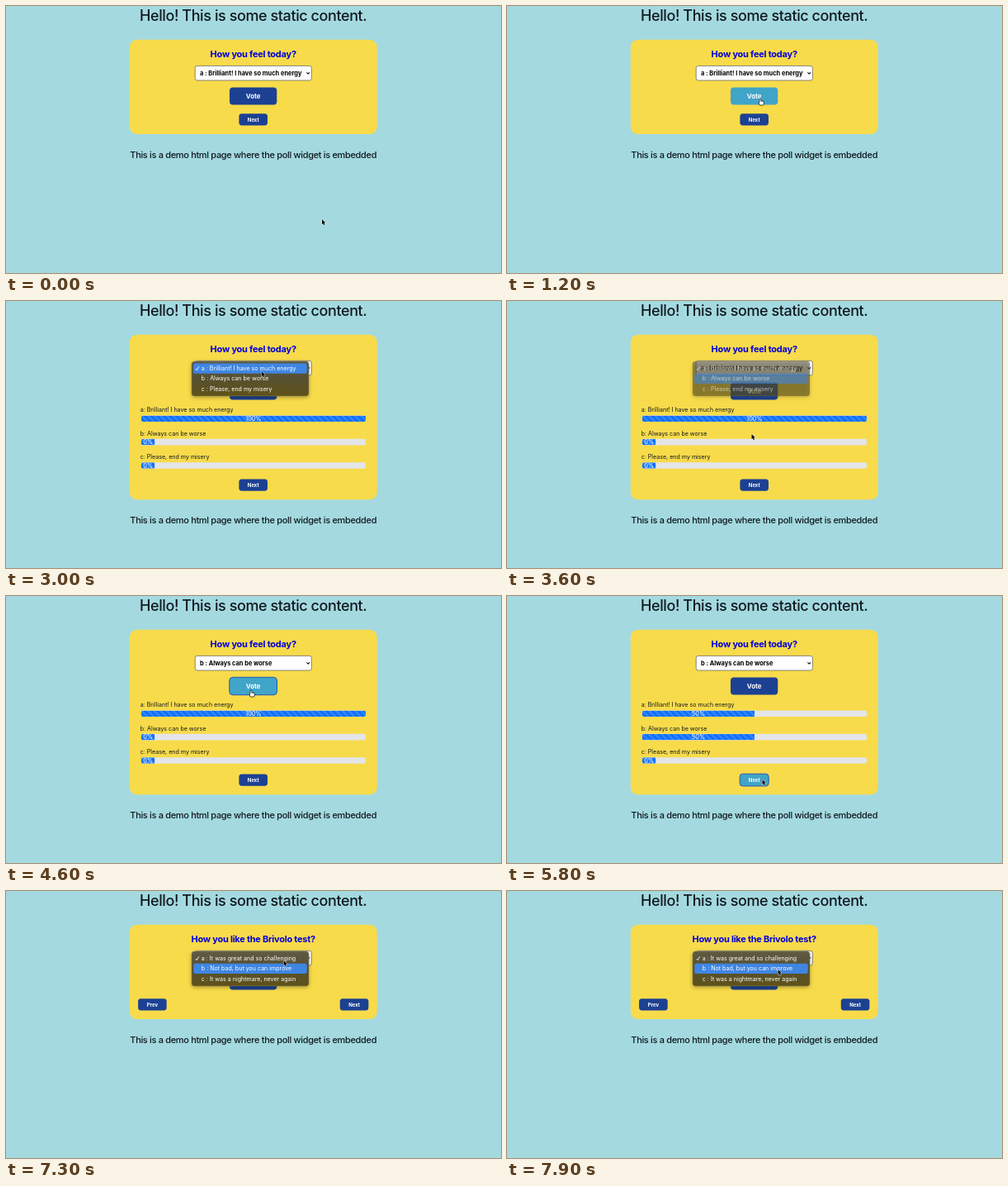
These frames come from a looping animation (600 px wide and 323 px high, 8 s). An HTML page with a canvas:

```html
<!DOCTYPE html>
<html lang="en">
<head>
<meta charset="utf-8">
<title>Poll widget demo</title>
<style>
html, body { margin: 0; width: 100%; height: 100%; overflow: hidden; background: #a4d9e0; }
canvas { display: block; width: 600px; height: 323px; }
</style>
</head>
<body>
<canvas id="stage"></canvas>
<script>
const W = 600, H = 323, MID = 299.7, LOOP = 8000, STEP = 100;
const canvas = document.getElementById('stage');
const ctx = canvas.getContext('2d');
const dpr = window.devicePixelRatio || 1;
canvas.width = W * dpr;
canvas.height = H * dpr;

const FONT = 'Inter, Roboto, "Liberation Sans", sans-serif';
const NAVY = '#1c4193', HOVER = '#40a5c8', INK = '#11191f';

// Layout
const ROW = 28.4;             // distance between result bars
const GROW = 3 * ROW;         // extra card height while results show
const LINE = 12.2;            // menu line height
const select = { x: 229.2, y: 72.4, w: 141.2, h: 17.6 };
const vote = { x: 271, y: 98.5, w: 57.3, h: 21, r: 4 };
const navAt = (x, y) => ({ x, y, w: 34.6, h: 14.3, r: 3.4 });

// Key moments, in ms
const T = {
  vote1: 1300, results: 1400, open1: 2800, pick: 3400, closed: 3900,
  vote2: 4500, update: 4700, next: 5700, page2: 5900, open2: 7100
};

const polls = [
  { title: 'How you feel today?',
    options: ['Brilliant! I have so much energy', 'Always can be worse', 'Please, end my misery'] },
  { title: 'How you like the Brivolo test?',
    options: ['It was great and so challenging', 'Not bad, but you can improve', 'It was a nightmare, never again'] }
];

// Places where the cursor rests until it leaves, and how long it then travels
const stops = [
  { x: 383, y: 258, leave: 100, travel: 800 },
  { x: 307, y: 112, leave: T.results, travel: 600 },
  { x: 331.5, y: 147.5, leave: 2300, travel: 400 },
  { x: 312, y: 82, leave: T.open1 + 100, travel: 300 },
  { x: 303, y: 94, leave: T.pick, travel: 200 },
  { x: 296.5, y: 161, leave: 3800, travel: 400 },
  { x: 297, y: 114, leave: 4900, travel: 500 },
  { x: 309.5, y: 222, leave: 6300, travel: 300 },
  { x: 344.5, y: 91, leave: 6600, travel: 300 },
  { x: 338, y: 82, leave: T.open2 + 100, travel: 400 },
  { x: 328.5, y: 95, leave: LOOP, travel: 0 }
];

const clamp = v => Math.max(0, Math.min(1, v));
const ease = v => v * v * (3 - 2 * v);
const mix = (a, b, k) => a + (b - a) * k;
const progress = (t, from, span) => clamp((t - from) / span);
const entry = (i, sep, options) => 'abc'[i] + sep + options[i];
const inside = (p, b) => p.x >= b.x && p.x <= b.x + b.w && p.y >= b.y && p.y <= b.y + b.h;

function cursorAt(t) {
  let p = stops[0];
  for (let i = 0; i < stops.length - 1; i++) {
    const k = ease(progress(t, stops[i].leave, stops[i].travel));
    p = { x: mix(p.x, stops[i + 1].x, k), y: mix(p.y, stops[i + 1].y, k) };
  }
  return p;
}

function box(x, y, w, h, r, fill, stroke, width = .8) {
  ctx.beginPath();
  ctx.roundRect(x, y, w, h, r);
  if (fill) { ctx.fillStyle = fill; ctx.fill(); }
  if (stroke) { ctx.strokeStyle = stroke; ctx.lineWidth = width; ctx.stroke(); }
}

function text(str, x, y, size, weight, color, align = 'left', track = 0) {
  ctx.font = `${weight} ${size}px ${FONT}`;
  ctx.letterSpacing = `${track}em`;
  ctx.textAlign = align;
  ctx.fillStyle = color;
  ctx.fillText(str, x, y);
}

function line(points, color, width) {
  ctx.beginPath();
  points.forEach(p => ctx.lineTo(p[0], p[1]));
  ctx.strokeStyle = color;
  ctx.lineWidth = width;
  ctx.stroke();
}

function button(b, label, size, hover, focus) {
  box(b.x, b.y, b.w, b.h, b.r, hover ? HOVER : NAVY);
  if (focus) box(b.x - .2, b.y - .2, b.w + .4, b.h + .4, b.r, null, hover ? '#1b50bd' : '#2f7ae0', 1);
  text(label, b.x + b.w / 2, b.y + b.h / 2 + size * .36, size, 700, '#fff', 'center');
}

function selectBox(label) {
  box(select.x, select.y, select.w, select.h, 2.5, '#fff', '#6d6d6d');
  text(label, select.x + 5.8, 84, 7.43, 700, '#000');
  line([[364.4, 80.4], [366.2, 82.2], [368, 80.4]], '#111', 1.1);
}

function bar(i, share) {
  const x = 164, y = 138.4 + i * ROW, full = 272, h = 7.6;
  const w = Math.max(full * .06, full * share);
  text(entry(i, ': ', polls[0].options), x - 1.3, y - 4, 7.1, 400, INK);
  box(x, y, full, h, 2, '#e3e5e8');
  ctx.save();
  ctx.clip();
  ctx.beginPath();
  ctx.rect(x, y, w, h);
  ctx.clip();
  ctx.fillStyle = '#0d6efd';
  ctx.fillRect(x, y, w, h);
  for (let s = x - h; s < x + w; s += h) {
    line([[s - h / 2, y - h / 2], [s + h * 1.5, y + h * 1.5]], 'rgba(255,255,255,.15)', h * Math.SQRT1_2 / 2);
  }
  ctx.restore();
  text(Math.round(share * 100) + '%', x + w / 2, y + 6.5, 7.4, 400, '#fff', 'center');
}

function menu(options, active, alpha) {
  const x = 225, y = 73, w = 142, h = 42;
  const shade = ctx.createLinearGradient(0, y, 0, y + h);
  shade.addColorStop(0, '#5e5a44');
  shade.addColorStop(.5, '#57502f');
  shade.addColorStop(1, '#5f5219');
  ctx.save();
  ctx.globalAlpha = alpha;
  ctx.shadowColor = 'rgba(0,0,0,.35)';
  ctx.shadowBlur = 5 * dpr;
  ctx.shadowOffsetY = 1.5 * dpr;
  box(x, y, w, h, 3.5, shade);
  ctx.shadowColor = 'transparent';
  box(x, y, w, h, 3.5, null, 'rgba(150,140,100,.7)', .6);
  box(x + 2.3, y + 2.6 + active * LINE, w - 4.6, LINE, 2, '#3f86e3');
  options.forEach((o, i) => text(entry(i, ' : ', options), x + 11.8, y + 11.1 + i * LINE, 7.1, 400, '#fff'));
  line([[x + 4.8, y + 9], [x + 6.2, y + 10.7], [x + 8.8, y + 6.3]], '#fff', .9);
  ctx.restore();
}

function arrow(x, y) {
  ctx.lineJoin = 'round';
  ctx.beginPath();
  [[0, 0], [0, 6.3], [1.4, 5], [2.4, 7.3], [3.5, 6.8], [2.5, 4.6], [4.4, 4.5]]
    .forEach(p => ctx.lineTo(x + p[0], y + p[1]));
  ctx.closePath();
  ctx.strokeStyle = 'rgba(255,255,255,.9)';
  ctx.lineWidth = 1;
  ctx.stroke();
  ctx.fillStyle = '#000';
  ctx.fill();
}

function hand(x, y) {
  box(x - .8, y, 1.6, 5, .8, '#fff', '#111');
  box(x - 1.6, y + 3, 6, 5, 1.8, '#fff', '#111');
  box(x - .4, y + 1, .8, 4, .4, '#fff');
}

function draw(t) {
  const second = t >= T.page2;
  const wide = t >= T.results && !second;
  const grow = wide ? GROW : 0;
  const { title, options } = polls[second ? 1 : 0];
  const chosen = !second && t >= T.closed ? 1 : 0;
  const open1 = t >= T.open1 && t < T.closed, open2 = t >= T.open2;
  const p = cursorAt(t);

  ctx.setTransform(dpr, 0, 0, dpr, 0, 0);
  ctx.fillStyle = '#a4d9e0';
  ctx.fillRect(0, 0, W, H);
  text('Hello! This is some static content.', MID, 18.3, 18, 500, INK, 'center', -.023);
  box(149.8, 40.7, 300, 114.4 + grow, 9, '#f8db4a');
  text(title, MID, 62, 11, 700, '#0000dc', 'center', -.022);
  selectBox(entry(chosen, ' : ', options));

  const voteHover = !open1 && !open2 && inside(p, vote);
  const voteFocus = (t >= T.vote1 && t < T.open1) || (t >= T.vote2 && t < T.next);
  button(vote, 'Vote', 7.9, voteHover, voteFocus);

  if (wide) {
    const k = ease(progress(t, T.update, 600));
    [mix(1, .5, k), k / 2, 0].forEach((share, i) => bar(i, share));
  }
  const next = navAt(second ? 404.8 : 282.4, 130.2 + grow);
  if (second) button(navAt(160.1, next.y), 'Prev', 6, false, !open2);
  button(next, 'Next', 6, inside(p, next), t >= T.next && !second);
  text('This is a demo html page where the poll widget is embedded',
    MID, 184.2 + grow, 11, 500, INK, 'center', -.03);

  if (open1 || open2) {
    const active = t >= T.pick || p.y > 88 ? 1 : 0;
    menu(options, active, open2 ? 1 : 1 - progress(t, T.pick, T.closed - T.pick));
  }
  if (voteHover) hand(p.x, p.y); else arrow(p.x, p.y);
}

const start = performance.now();
function tick() {
  const t = (performance.now() - start) % LOOP;
  draw(Math.floor(t / STEP) * STEP);
  requestAnimationFrame(tick);
}
tick();
</script>
</body>
</html>
```
